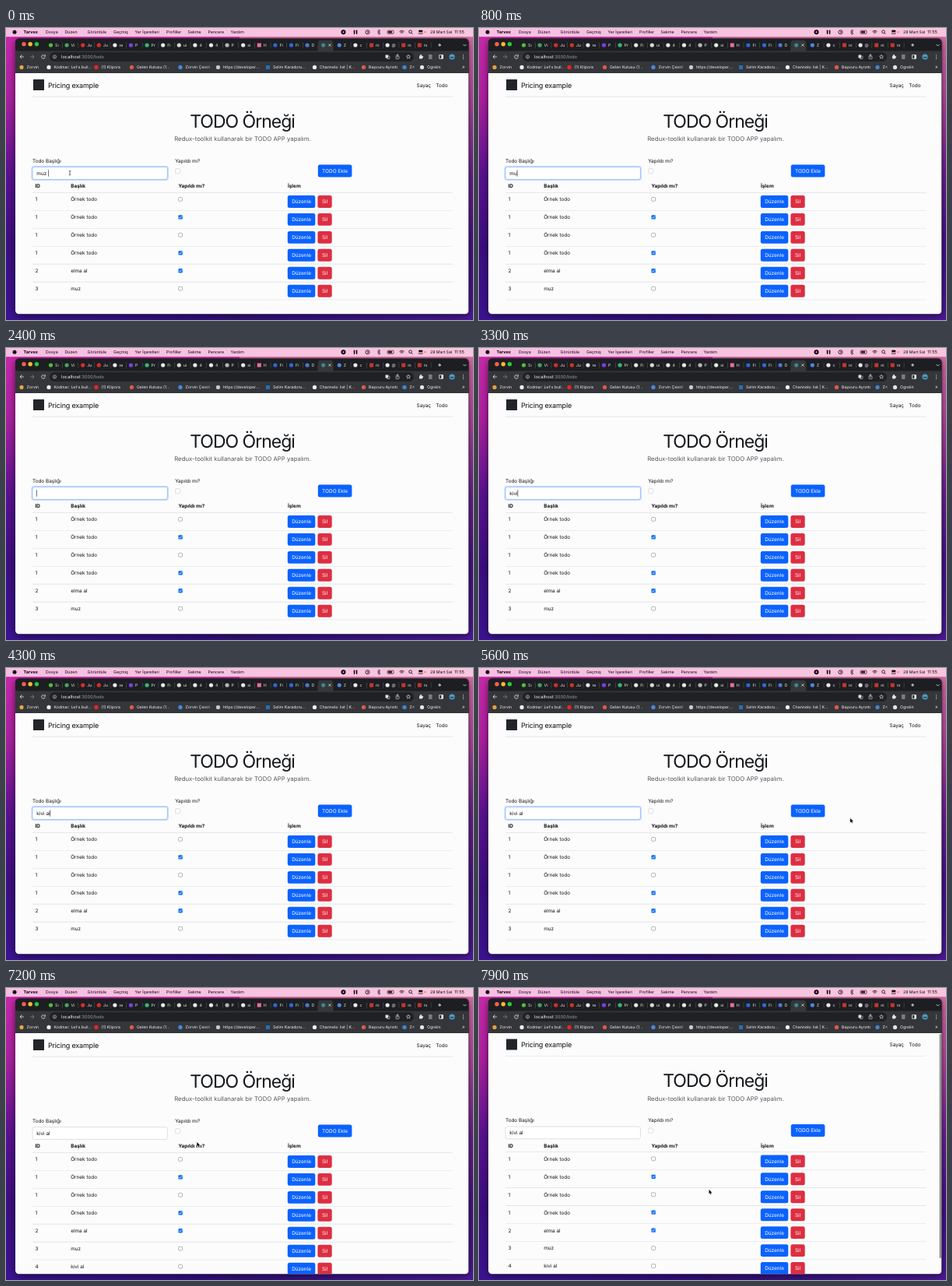
Recreate the animation shown at these times as an HTML page with a canvas. Size 600x375 px, loop 8 s.

```html
<!DOCTYPE html>
<html lang="tr">
<head>
<meta charset="utf-8">
<title>TODO Örneği</title>
<style>
  html, body { margin: 0; width: 100%; height: 100%; overflow: hidden; background: #3a0d80; }
  canvas { display: block; width: 600px; height: 375px; }
</style>
</head>
<body>
<canvas id="stage"></canvas>
<script>
const W = 600, H = 375, LOOP = 8000;
const canvas = document.getElementById('stage');
const ratio = window.devicePixelRatio || 1;
canvas.width = W * ratio;
canvas.height = H * ratio;
const ctx = canvas.getContext('2d');
const FONT = 'Inter, "Open Sans", sans-serif';
const BLUE = '#0b62fd', RED = '#dc2f42', INK = '#0e1013';
const WIN = { x: 12, y: 13.6, w: 582.5, h: 353.6, page: 58 };

function text(str, x, y, size, color, { weight = 400, align = 'left', track = 0 } = {}) {
  ctx.font = `${weight} ${size}px ${FONT}`;
  ctx.letterSpacing = track + 'px';
  ctx.textAlign = align;
  ctx.fillStyle = color;
  ctx.fillText(str, x, y);
  return ctx.measureText(str).width;
}

function rect(x, y, w, h, color, r = 0) {
  ctx.fillStyle = color;
  ctx.beginPath();
  ctx.roundRect(x, y, w, h, r);
  ctx.fill();
}

function frame(x, y, w, h, color, r = 0, line = 0.6) {
  ctx.strokeStyle = color;
  ctx.lineWidth = line;
  ctx.beginPath();
  ctx.roundRect(x, y, w, h, r);
  ctx.stroke();
}

function dot(x, y, r, color) {
  ctx.fillStyle = color;
  ctx.beginPath();
  ctx.arc(x, y, r, 0, Math.PI * 2);
  ctx.fill();
}

function ring(x, y, r, color, line = 0.8, from = 0, to = Math.PI * 2) {
  ctx.strokeStyle = color;
  ctx.lineWidth = line;
  ctx.beginPath();
  ctx.arc(x, y, r, from, to);
  ctx.stroke();
}

function path(points, color, line = 0.8) {
  ctx.strokeStyle = color;
  ctx.lineWidth = line;
  ctx.beginPath();
  points.forEach(([x, y], i) => i ? ctx.lineTo(x, y) : ctx.moveTo(x, y));
  ctx.stroke();
}

function gradient(x1, y1, stops) {
  const g = ctx.createLinearGradient(0, 0, x1, y1);
  stops.forEach((c, i) => g.addColorStop(i / (stops.length - 1), c));
  return g;
}

// Timeline: [time, field value]
const KEYS = [
  [0, 'muz '], [550, 'muz'], [700, 'mu'], [850, 'm'], [1000, ''],
  [2500, 'k'], [2700, 'ki'], [2900, 'kiv'], [3100, 'kivi'],
  [3500, 'kivi '], [3800, 'kivi a'], [4100, 'kivi al']
];
const CLICK = 6050, SCROLL = 7750;

// Pointer stops: [time, x, y]
const MOVES = [
  [4900, 82, 186], [5600, 477, 193], [5850, 426, 186], [6100, 426, 186],
  [6500, 238, 189], [7000, 238, 189], [7900, 295.5, 259], [8000, 295.5, 259]
];

function pointerAt(t) {
  if (t < KEYS[1][0]) return [82, 186];
  if (t < MOVES[0][0]) return null;
  const i = MOVES.findIndex(m => m[0] > t);
  const [t0, x0, y0] = MOVES[i - 1], [t1, x1, y1] = MOVES[i];
  const p = (t - t0) / (t1 - t0), e = p * p * (3 - 2 * p);
  return [x0 + (x1 - x0) * e, y0 + (y1 - y0) * e];
}

const inside = (p, x, y, w, h) => p && p[0] >= x && p[0] <= x + w && p[1] >= y && p[1] <= y + h;

function wallpaper() {
  rect(0, 0, W, H, gradient(0, H, ['#c92aa8', '#a81f9d', '#5a1090', '#3a0d80', '#3c1291']));
  rect(300, 0, 300, H, gradient(0, H, ['#d873a8', '#b0459c', '#6a1f90', '#431088', '#4a1896']));
  rect(0, 368, W, 7, gradient(W, 0, ['#3c1291', '#32107c', '#4a1896']));
  ctx.save();
  ctx.shadowColor = 'rgba(0,0,0,0.6)';
  ctx.shadowBlur = 9 * ratio;
  ctx.shadowOffsetY = 2 * ratio;
  rect(WIN.x, WIN.y, WIN.w, WIN.h, '#111', 5);
  ctx.restore();
}

const MENU = [
  ['Dosya', 51], ['Düzen', 75.5], ['Görüntüle', 104.5], ['Geçmiş', 138], ['Yer İşaretleri', 165.5],
  ['Profiller', 206], ['Sekme', 233.5], ['Pencere', 259.5], ['Yardım', 288.5]
];

function menuBar() {
  const ink = '#0c060b';
  rect(0, 0, W, 11.3, gradient(W, 0, ['#f6bfe3', '#f7c2e0', '#f8c6dc']));
  dot(11, 5.3, 2.5, ink);
  text('Tarvex', 22.5, 7.3, 5.5, ink, { weight: 700 });
  MENU.forEach(([s, x]) => text(s, x, 7.3, 5.3, ink));
  dot(433.5, 5.3, 3, ink);
  dot(433.5, 5.3, 1, '#f7c4df');
  rect(446.8, 2.5, 1.5, 5.5, ink, 0.7);
  rect(449.8, 2.5, 1.5, 5.5, ink, 0.7);
  ring(464.5, 5.3, 2.6, ink);
  path([[463.8, 4], [465.8, 5.3], [463.8, 6.6]], ink);
  path([[477, 3.5], [481, 7], [479, 8.5], [479, 2], [481, 3.5], [477, 7]], ink, 0.6);
  frame(490, 3.2, 8, 4.2, ink, 1);
  rect(491, 4.2, 5, 2.2, ink);
  for (const r of [1.2, 2.7, 4.2]) ring(508.5, 7.6, r, ink, 0.8, Math.PI * 1.25, Math.PI * 1.75);
  ring(519.5, 4.8, 1.9, ink);
  path([[520.9, 6.2], [522.3, 7.8]], ink);
  rect(530, 2.8, 5.5, 2.2, ink, 1.1);
  frame(530.3, 5.8, 5, 1.8, ink, 0.9);
  dot(538.5, 5.3, 1, '#f2662b');
  text('28 Mart Sal', 545, 7.3, 5.2, ink);
  text('11:55', 576, 7.3, 5.6, ink);
}

const TABS = [
  ['#55b948', 'Sı'], ['#48a360', 'Vi'], ['#e02b2b', 'Ju'], ['#e02b2b', 'Ju'], ['#e8e8e8', 're'],
  ['#7a3df0', 'P'], ['#35b97a', 'Pr'], ['#e8e8e8', 'Fi'], ['#d8d8d8', 'ui'], ['#e8e8e8', '4'],
  ['#e8e8e8', '4'], ['#b8b8b8', 'P'], ['#e8e8e8', 'si'], ['#ee6f9c', 'H'], ['#2d67e0', 'Fi'],
  ['#2d67e0', 'Fi'], ['#4a78d8', 'D'], ['#3f8391', ''], ['#4a86ea', 'Z'], ['#e8e8e8', 'c'],
  ['#cb3434', 'ni'], ['#e8e8e8', '@'], ['#cb3434', 'ni'], ['#cb3434', 'ni']
];

const MARKS = [
  [20, '#e9a33a', 'Zorvin'], [55, '#f0f0f0', "Kodmar: Let's buil…"], [116, '#f02525', '(1) Klipora'],
  [161.5, '#e2574a', 'Gelen Kutusu (1…'], [224, '#4a86ea', 'Zorvin Çeviri'], [272.5, '#c8c8c8', 'https://developer.…'],
  [336.5, '#1d73b8', 'Selim Karadoru…'], [396.5, '#f0f0f0', 'Channels: list | K…'],
  [459.5, '#dd5b48', 'Başvuru Ayrıntı'], [512, '#3f86d8', 'Z<'], [534.5, '#e4e4e4', 'Ogrelin']
];

function icon(x, y, color, square) {
  if (square) rect(x - 2.5, y - 2.5, 5, 5, color);
  else dot(x, y, 2.6, color);
}

function browserBars() {
  const pale = '#e2e3e5', grey = '#9aa0a6';
  rect(WIN.x, WIN.y, WIN.w, 17, '#1d1e21');
  rect(WIN.x, 29.5, WIN.w, 29, '#35363a');
  ['#f25e57', '#f5bd2f', '#2bc640'].forEach((c, i) => dot(23 + i * 8.2, 20.8, 2.7, c));

  rect(400.5, 15.8, 20, 15, '#35363a', [4, 4, 0, 0]);
  TABS.forEach(([color, label], i) => {
    const x = 57.5 + i * 20.6;
    icon(x, 22, color, color === '#cb3434' || color === '#ee6f9c');
    if (label) text(label, x + 5.5, 24, 5.3, pale);
    else path([[x + 6.5, 20.5], [x + 9.5, 23.5], [x + 8, 22], [x + 9.5, 20.5], [x + 6.5, 23.5]], pale, 0.6);
    if (i !== 16 && i !== 17) rect(x + 14.5, 18.5, 0.5, 7, '#5a5c60');
  });
  path([[555, 22], [559, 22], [557, 22], [557, 20], [557, 24]], pale, 0.7);
  path([[587.5, 21], [589.5, 23], [591.5, 21]], pale, 0.8);

  path([[23, 37], [18, 37], [20.3, 34.7], [18, 37], [20.3, 39.3]], pale);
  path([[31, 37], [36, 37], [33.7, 34.7], [36, 37], [33.7, 39.3]], '#7b7d81');
  ring(48, 37, 2.3, pale, 0.8, 0.2, 5.4);
  path([[50.4, 34.2], [50.4, 36.2], [48.4, 36.2]], pale);
  rect(56, 31.3, 468, 11.6, '#202124', 5.8);
  ring(62.5, 37, 2.1, pale, 0.6);
  rect(62.2, 36.5, 0.7, 1.8, pale);
  const host = text('localhost', 71, 39, 5.75, '#f4f4f4');
  text(':3000/todo', 71 + host, 39, 5.75, grey);

  rect(487.5, 34.5, 3.6, 4, pale, 0.5);
  frame(489.5, 36, 3.4, 3.6, pale, 0.5, 0.6);
  frame(501, 36, 4, 3.6, pale, 0.5, 0.6);
  path([[503, 38], [503, 33.8], [501.7, 35.2], [503, 33.8], [504.3, 35.2]], pale, 0.6);
  ctx.beginPath();
  for (let i = 0; i < 10; i++) {
    const a = -Math.PI / 2 + i * Math.PI / 5, r = i % 2 ? 1.2 : 2.7;
    ctx.lineTo(517 + r * Math.cos(a), 37 + r * Math.sin(a));
  }
  ctx.closePath();
  ctx.lineWidth = 0.6;
  ctx.stroke();
  rect(531, 35.4, 4, 4, pale, 0.6);
  dot(533, 35, 1, pale);
  dot(535.2, 37.3, 1, pale);
  for (const y of [35, 37, 39]) path([[543, y], [547.5, y]], pale, 0.8);
  frame(556.5, 34.6, 5, 4.8, pale, 0.4, 0.8);
  rect(559.3, 34.6, 2.4, 4.8, pale);
  dot(573, 37, 3.6, '#4d9ac7');
  rect(570.5, 37, 5, 1.6, '#23495f', 0.8);
  for (const y of [34.8, 37, 39.2]) dot(587.5, y, 0.6, pale);

  MARKS.forEach(([x, color, label], i) => {
    icon(x, 50.4, color, i === 6);
    text(label, x + 6.5, 52.4, 5.2, '#f0f1f2');
  });
  text('»', 586, 52.2, 6, pale);
}

function checkbox(x, y, on) {
  if (!on) {
    rect(x, y, 5.2, 5.2, '#fff', 0.9);
    frame(x + 0.2, y + 0.2, 4.8, 4.8, '#777', 0.9, 0.55);
    return;
  }
  rect(x, y, 5.3, 5.3, '#0b6cf5', 0.9);
  path([[x + 1.1, y + 2.8], [x + 2.2, y + 3.9], [x + 4.2, y + 1.3]], '#fff', 0.8);
}

function button(label, x, y, w, color, hoverColor, p) {
  const hot = inside(p, x, y, w, 15.9);
  rect(x, y, w, 15.9, hot ? hoverColor : color, 2.5);
  text(label, x + w / 2, y + 10.3, 6.45, '#fff', { align: 'center' });
}

function field(t) {
  const at = KEYS.findLastIndex(k => k[0] <= t), [since, value] = KEYS[at];
  const focused = t < CLICK;
  if (focused) rect(32.4, 177, 176.6, 19, '#c2dafe', 3.8);
  rect(34, 178.6, 173.4, 15.8, '#fff', 2.5);
  frame(34, 178.6, 173.4, 15.8, focused ? '#86b7fe' : '#ced4da', 2.5, 0.7);
  const width = text(value, 39.3, 189, 6.45, INK);
  const lit = Math.floor((t - since) / 500) % 2 === 0;
  if (focused && lit) rect(39.3 + width, 182.3, 0.6, 8.4, '#111');
}

const ROWS = [
  [1, 'Örnek todo', 0], [1, 'Örnek todo', 1], [1, 'Örnek todo', 0],
  [1, 'Örnek todo', 1], [2, 'elma al', 1], [3, 'muz', 0], [4, 'kivi al', 0]
];

function page(t, p) {
  rect(WIN.x, WIN.page, WIN.w, 310, '#fcfcfd');
  const shift = t < SCROLL ? 0 : 0.6;
  ctx.save();
  ctx.beginPath();
  ctx.rect(WIN.x, WIN.page, WIN.w, 310);
  ctx.clip();
  ctx.translate(0, -shift);

  rect(35, 66, 14, 14, '#212529');
  text('Pricing example', 54, 76.6, 9, INK, { track: -0.2 });
  text('Sayaç', 527.5, 75.6, 6.45, INK);
  text('Todo', 552.3, 75.6, 6.45, INK);
  rect(34, 87.8, 540, 0.6, '#d9dde1');

  text('TODO Örneği', 303.5, 128, 23, '#15181b', { align: 'center', track: -1 });
  text('Redux-toolkit kullanarak bir TODO APP yapalım.', 304, 145.4, 7.8, '#54595f', { align: 'center' });

  text('Todo Başlığı', 34, 173, 6.4, INK);
  text('Yapıldı mı?', 217.2, 173, 6.4, INK);
  field(t);
  rect(217.6, 180.6, 6.2, 6.2, '#fff', 1.6);
  frame(217.6, 180.6, 6.2, 6.2, '#c6c8ca', 1.6, 0.6);
  button('TODO Ekle', 400.8, 175.6, 43.6, BLUE, '#0b55d3', p);

  [['ID', 37.5], ['Başlık', 83.2], ['Yapıldı mı?', 221.6], ['İşlem', 362]]
    .forEach(([s, x]) => text(s, x, 205.3, 6.4, INK, { weight: 700 }));
  rect(34, 211, 540, 0.6, '#cfd3d7');

  const count = t < CLICK ? 6 : 7;
  ROWS.slice(0, count).forEach(([id, title, done], i) => {
    const y = 211.3 + i * 22.95;
    text(id, 37.5, y + 11, 6.45, INK);
    text(title, 83.2, y + 11, 6.4, INK);
    checkbox(221.5, y + 6, done);
    button('Düzenle', 361.8, y + 3.7, 35.5, BLUE, '#0b55d3', p);
    button('Sil', 400.4, y + 3.7, 18.3, RED, '#bb2d3b', p);
    rect(34, y + 22.7, 540, 0.6, '#dadee2');
  });
  ctx.restore();
  if (t >= SCROLL) rect(591.6, 59, 2.3, 288, '#8d8d8d', 1.1);
}

function pointer(p) {
  if (!p) return;
  const [x, y] = p;
  if (inside(p, 34, 178, 174, 17)) {
    path([[x - 1.3, y - 3], [x, y - 2.5], [x + 1.3, y - 3]], '#222', 0.6);
    path([[x, y - 2.5], [x, y + 2.5]], '#222', 0.7);
    path([[x - 1.3, y + 3], [x, y + 2.5], [x + 1.3, y + 3]], '#222', 0.6);
    return;
  }
  ctx.save();
  ctx.translate(x, y);
  ctx.beginPath();
  [[0, 0], [0, 5.3], [1.2, 4.2], [2.1, 6.2], [3, 5.8], [2.2, 3.9], [3.8, 3.8]]
    .forEach(q => ctx.lineTo(...q));
  ctx.closePath();
  ctx.lineWidth = 1;
  ctx.strokeStyle = '#fff';
  ctx.stroke();
  ctx.fillStyle = '#000';
  ctx.fill();
  ctx.restore();
}

function draw() {
  const t = performance.now() % LOOP;
  const p = pointerAt(t);
  ctx.setTransform(ratio, 0, 0, ratio, 0, 0);
  ctx.textRendering = 'geometricPrecision';
  wallpaper();
  menuBar();
  ctx.save();
  ctx.beginPath();
  ctx.roundRect(WIN.x, WIN.y, WIN.w, WIN.h, 4.5);
  ctx.clip();
  browserBars();
  page(t, p);
  ctx.restore();
  pointer(p);
  requestAnimationFrame(draw);
}
draw();
</script>
</body>
</html>
```
